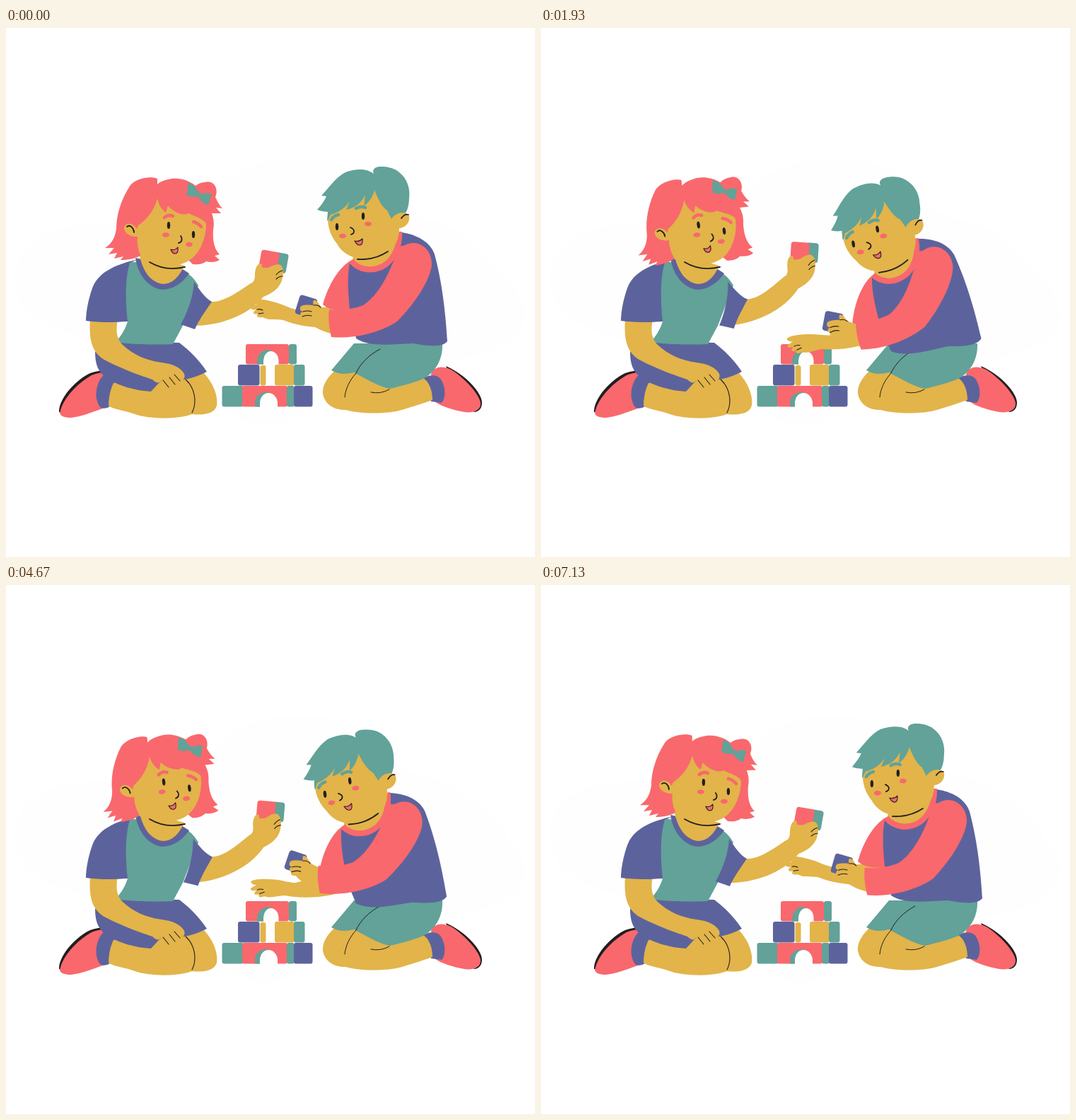
An HTML page for the animation above (7210 ms loop, 748x748 px).

```html
<!DOCTYPE html>
<html lang="en">
<head>
<meta charset="utf-8">
<title>Children playing with blocks</title>
<style>
html, body { margin: 0; height: 100%; overflow: hidden; background: #fff; }
svg { display: block; width: 100%; height: 100%; }
.coral { fill: #f9686d; }
.teal { fill: #62a298; }
.skin { fill: #e2b44a; }
.indigo { fill: #5c639c; }
.black { fill: #231f20; }
.white { fill: #fefefe; }
.line, .brow { fill: none; stroke: #231f20; stroke-width: 1.1; stroke-linecap: round; stroke-linejoin: round; }
.bold { stroke-width: 1.8; }
.brow { stroke-width: 4.5; }
</style>
</head>
<body>
<svg viewBox="0 0 748 748">
  <path fill="#fefefe" d="M12 352C14 305 60 277 130 277C220 278 270 262 300 228C330 180 450 172 500 205C540 230 545 265 600 272C650 278 735 370 735 405C730 480 560 470 480 490C430 530 410 562 365 562C310 560 290 500 230 470C150 440 10 440 12 352Z"/>

  <g id="tower">
    <rect class="teal" x="305.500" y="506" width="30.500" height="29.500" rx="3"/>
    <rect class="coral" x="334" y="506" width="64" height="29.500" rx="3"/>
    <path class="teal" d="M352 535.500V530C352 519 361 514 372 515L384 528V535.500Z"/>
    <path class="white" d="M359 536V529C360 521 365 516 371 516C378 516 383 522 384 529V536Z"/>
    <rect class="teal" x="397" y="506" width="11" height="29.500" rx="3"/>
    <rect class="indigo" x="407" y="506" width="26.500" height="29.500" rx="3"/>
    <rect class="indigo" x="328" y="476" width="30.500" height="29.500" rx="3"/>
    <rect class="skin" x="359.500" y="477" width="8" height="28.500" rx="3"/>
    <rect class="skin" x="380" y="476" width="27.500" height="29.500" rx="3"/>
    <rect class="teal" x="407" y="476" width="15.500" height="29.500" rx="3"/>
    <rect class="coral" x="339" y="447" width="61" height="28.500" rx="3"/>
    <path class="teal" d="M355 475.500V471C356 460 364 454 374 455.500L385 468V475.500Z"/>
    <path class="white" d="M364 476V470C365 462 369 457 374.500 457C380 457 385 462 385.500 470V476Z"/>
    <rect class="teal" x="400" y="447" width="11" height="28.500" rx="3"/>
  </g>

  <g id="girl">
    <path class="black" d="M75 543C74 526 96 499 119 488C134 483 150 483 156 487L135 530L90 549Z"/>
    <path class="coral" d="M77 541C81 524 101 502 121 491C134 486 148 485 154 487L140 537C122 543 105 550 92 551C80 551 74 547 77 541Z"/>
    <path class="indigo" d="M133 497C140 486 150 485 156 489L160 505L147 535Q142 539 134 537C126 528 125 512 133 497Z"/>
    <path class="skin" d="M245 490L280 488C293 502 300 520 298 534C295 545 280 548 262 546Z"/>
    <path class="skin" d="M152 502L205 495L254 488C270 508 272 535 263 546C242 554 202 553 182 546C167 540 152 540 145 534C145 524 147 512 152 502Z"/>
    <path class="line" d="M254 497C268 510 270 530 263 544"/>
    <path class="indigo" d="M126 458C126 475 130 486 141 494C160 507 185 513 205 514L218 500L252 497C264 495 275 491 284 486C275 472 262 458 245 445L155 443Z"/>
    <path class="teal" d="M176 330C160 355 162 390 165 415L172 415C168 428 162 436 155 444C180 448 212 448 236 447C240 440 245 430 250 421L272 364C264 350 256 346 248 342Z"/>
    <g id="girlArm">
      <g transform="rotate(10 380 330)">
        <rect class="teal" x="380" y="316.500" width="18" height="28" rx="4"/>
        <rect class="coral" x="359" y="316.500" width="26" height="28" rx="4"/>
      </g>
      <path class="skin" d="M266 421C300 421 341 408 364 380C380 374 390 364 391 352C393 346 392 338 388 335C383 333 376 336 371 339L363 339C361 337 363 334 360 333C354 333 352 343 352 349C352 356 350 360 346 361C328 373 308 388 290 387L268 395Z"/>
      <path class="line" d="M391 343Q386 344 382 349M391 351Q386 351 382 355"/>
      <path class="indigo" d="M266 359C274 370 281 382 291 387C283 399 273 412 267 426L247 419C255 405 264 385 266 359Z"/>
    </g>
    <path class="skin" d="M119 412C117 440 121 457 137 468C165 483 195 493 207 497C212 502 216 503 219 499C222 508 226 512 230 508C235 512 240 510 238 503C244 507 247 504 245 498C250 500 254 495 252 489C247 480 236 475 220 473C198 470 180 462 165 448C156 439 155 428 158 412Z"/>
    <path class="line" d="M230 508L222 498M239 504L231 494M246 499L238 490"/>
    <path class="indigo" d="M187 327C160 333 131 343 122 368C116 385 113 402 113 414C135 417 155 416 172 415C169 388 168 355 175 332Z"/>
    <path class="indigo" d="M183 325C187 352 204 369 222 370C240 369 252 357 259 347L248 340Z"/>
    <path class="skin" d="M188 318L252 336C245 352 235 362 222 362C205 360 193 345 188 318Z"/>
    <g id="girlHead">
      <path class="coral" d="M214 213C205 209 185 212 176 222C164 240 156 262 156 284C154 298 148 306 140 311L153 311L145 320L157 318L153 326L166 323L162 328C172 328 182 326 188 323L230 300L264 334C272 335 278 334 283 330C290 332 297 331 302 328L295 322L302 320C294 312 292 300 293 285C295 275 293 268 291 262L304 262L297 254L306 255C300 249 298 243 296 239C301 227 294 215 282 218C276 218 271 221 268 223C255 213 240 211 230 214C224 215 218 217 214 221Z"/>
      <path class="skin" d="M187 279C200 270 210 257 214 241C216 250 220 257 226 261L229 251C238 262 252 266 258 262C268 267 280 270 283 277C283 300 272 323 255 331C235 340 205 336 191 323C186 312 185 302 186 295C177 296 167 290 167 283C168 275 179 274 185 284Z"/>
      <path class="teal" d="M258 219C264 220 269 225 271 231L276 235C281 233 286 233 291 235C288 240 288 246 286 250C280 249 276 245 274 241L269 238C264 240 260 238 255 236C257 230 256 225 258 219Z"/>
      <path class="brow" style="stroke:#f9686d" d="M224 268Q230 263 236 266M265 274Q272 276 276 281"/>
      <ellipse class="black" cx="230" cy="279" rx="2.200" ry="5"/>
      <ellipse class="black" cx="265" cy="292" rx="2.200" ry="5"/>
      <ellipse class="coral" cx="226" cy="292.500" rx="5" ry="3.300"/>
      <ellipse class="coral" cx="259" cy="306" rx="5" ry="3.300"/>
      <path class="line bold" d="M247 294C250 298 249 303 244 304M171 281C176 277 181 284 181 289"/>
      <path class="coral" d="M233 313Q239 315 243 310Q244 319 239 319Q235 319 233 313Z"/>
      <path class="line" d="M233 313Q239 315 243 310Q244 319 239 319Q235 319 233 313Z"/>
    </g>
    <path class="line bold" d="M203 331C218 340 236 342 253 338"/>
  </g>

  <g id="boy">
    <path class="black" d="M622 478C650 490 673 516 673 530C673 538 668 543 662 543L640 520Z"/>
    <path class="coral" d="M601 489C605 478 620 476 634 486C651 498 669 518 671 530C672 541 660 545 648 543C632 540 615 535 606 528Z"/>
    <path class="indigo" d="M588 497C598 489 610 490 615 497C623 510 621 525 616 530L601 528Z"/>
    <path class="skin" d="M470 480C455 492 447 505 448 517C451 533 464 540 480 540C500 546 540 546 560 540C580 534 592 530 603 526C603 512 598 500 590 495L540 500Z"/>
    <path class="teal" d="M492 446L460 484C470 490 480 490 492 487C510 497 530 508 543 510C560 506 580 501 592 495C608 485 618 468 617 446Z"/>
    <path class="line" style="stroke-width:1" d="M529 454C513 462 500 476 495 488C486 498 480 510 479 522M542 511Q530 518 516 515"/>
    <g id="boyBody">
      <g id="farArm">
        <path class="skin" d="M486 392L410 398C400 396 390 390 381 388C370 385 358 382 349 384C346 387 350 390 355 391L346 394C345 398 349 399 354 398C347 402 350 406 356 404C353 409 358 410 363 409C372 414 382 411 392 413C410 420 430 424 458 424L486 420Z"/>
        <path class="line" d="M355 398Q359 397 363 399M357 404L364 403"/>
      </g>
      <path class="coral" d="M489 328C470 338 455 365 448 391C458 400 475 401 488 398Z"/>
      <path class="indigo" d="M486 332C482 355 484 375 486 398C488 420 494 430 495 439C515 452 545 447 575 446C598 450 617 452 624 443C622 410 618 365 606 320C600 302 580 292 560 289L535 335Z"/>
      <path class="skin" d="M492 318L554 282C557 305 548 337 514 338C502 337 494 332 490 328Z"/>
      <path class="brow" style="stroke:#f9686d;stroke-width:8;stroke-linecap:butt" d="M488 329C500 344 520 345 536 335C551 324 557 306 556 288"/>
      <g id="boyHead">
        <path class="teal" d="M440 257C446 250 450 245 453 238L446 237C455 228 465 212 480 204C495 199 510 198 520 206C517 200 522 196 530 196C540 196 546 198 552 201C566 210 572 225 570 240C570 252 567 260 562 266L520 290L454 272L455 260Q447 260 440 257Z"/>
        <path class="skin" d="M455 272L459 264C472 260 480 254 486 245L481 257C494 254 502 248 508 236L506 252C514 246 519 238 521 229C527 245 533 254 539 258L545 270C552 260 566 258 570 266C572 275 564 283 556 283C556 305 545 320 520 327C490 329 475 318 468 305C460 295 456 285 455 272Z"/>
        <path class="brow" style="stroke:#62a298" d="M460 271Q464 265 470 264M495 255Q502 251 508 254"/>
        <ellipse class="black" cx="468" cy="281" rx="2.200" ry="5"/>
        <ellipse class="black" cx="505" cy="266" rx="2.200" ry="5"/>
        <ellipse class="coral" cx="476" cy="294" rx="5" ry="3.300"/>
        <ellipse class="coral" cx="512" cy="277" rx="5" ry="3.300"/>
        <path class="line bold" d="M487 282C494 285 493 290 488 292M559 269Q564 262 569 264"/>
        <path class="coral" d="M493 301Q499 303 504 298Q505 307 500 307Q496 307 493 301Z"/>
        <path class="line" d="M493 301Q499 303 504 298Q505 307 500 307Q496 307 493 301Z"/>
        <path class="line bold" d="M497 327C514 328 528 324 540 316"/>
      </g>
      <g id="nearArm">
        <rect class="indigo" x="411.500" y="380" width="26" height="28" rx="4" transform="rotate(17 425 394)"/>
        <path class="skin" d="M462 401C452 399 446 396 443 391C438 382 432 383 435 392C426 391 417 391 416 395C415 399 417 400 420 401C415 402 415 407 419 408C417 411 420 414 425 413C432 421 442 427 462 433Z"/>
        <path class="line" d="M435 392Q441 391 445 395M420 401Q426 399 432 401M419 408Q426 405 432 407"/>
        <path class="coral" d="M556 308C545 340 530 376 505 392C490 398 470 400 457 398C455 410 457 425 460 437C495 440 530 430 553 415C580 388 600 355 602 335C603 312 582 296 562 308Z"/>
      </g>
    </g>
  </g>
</svg>
<script>
const LOOP = 7210, FRAMES = 45;
const stepStarts = [0, 100, 200, 270, 330];   // uneven frame times, repeating every 400 ms

const turn = (id, angle, x, y) =>
  document.getElementById(id).setAttribute("transform", `rotate(${angle.toFixed(3)} ${x} ${y})`);

function pose(ms) {
  const t = Math.min(ms % LOOP, 7199);
  const step = stepStarts.filter(s => s <= t % 400).length - 1;
  const phase = (Math.floor(t / 400) * 5 + step) / FRAMES * 2 * Math.PI;
  const swing = (1 - Math.cos(phase)) / 2, lag = Math.sin(phase);

  turn("girlHead", -7.2 * (1 - (1 - swing) ** 3), 223, 337);
  turn("girlArm", -6.8 * swing - 0.9 * lag, 262, 375);
  turn("boyBody", -9.7 * swing, 600, 450);
  turn("farArm", -7 * swing, 455, 350);
  turn("nearArm", 4.3 * swing + 5.2 * lag, 582, 325);
}

const start = performance.now();
(function tick() {
  pose(performance.now() - start);
  requestAnimationFrame(tick);
})();
</script>
</body>
</html>
```
